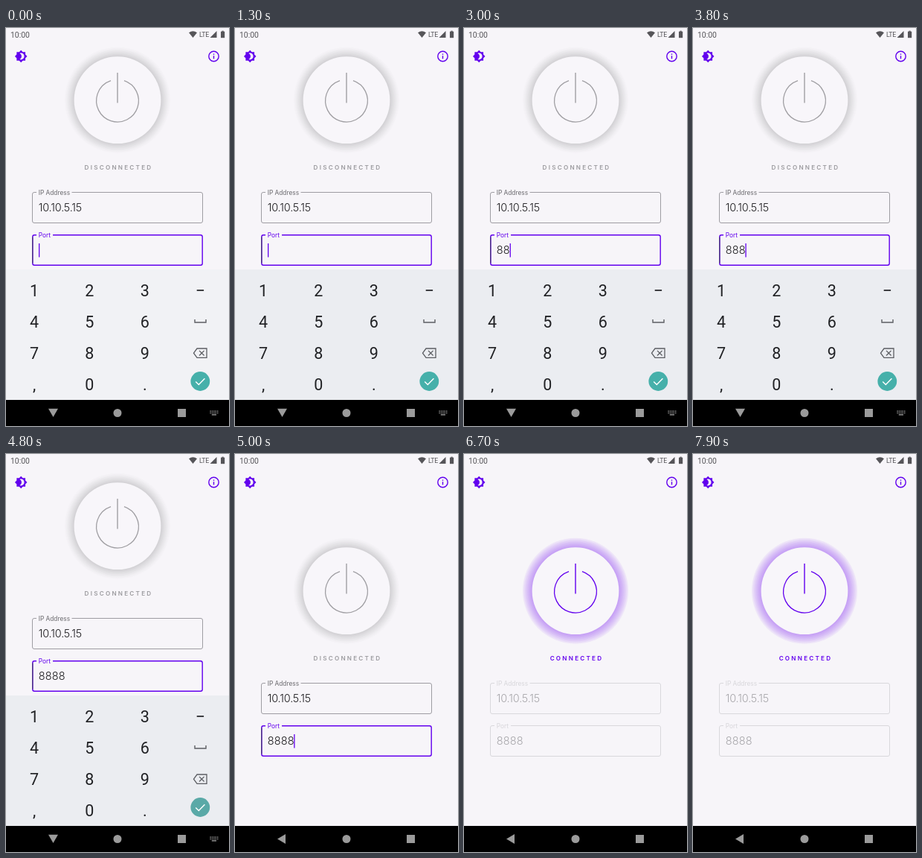
Write an HTML page with a canvas that moves like this. It is 300x534 px and loops after 8 s.

```html
<!DOCTYPE html>
<html lang="en">
<head>
<meta charset="utf-8">
<title>Connection screen</title>
<style>
html, body { margin: 0; width: 100%; height: 100%; overflow: hidden; background: #f7f5f9; }
canvas { display: block; width: 300px; height: 534px; }
</style>
</head>
<body>
<canvas id="stage"></canvas>
<script>
const LOOP = 8000;
const KEYS = [2400, 2900, 3400, 3950];
const SUBMIT = 4700, HIDE = 4900, CONNECT = 6400;
const BG = '#f7f5f9', PURPLE = '#6200ee';
const UI = 'Inter, "Open Sans", sans-serif';
const SYS = 'Roboto, "Noto Sans", sans-serif';

const canvas = document.getElementById('stage');
const ctx = canvas.getContext('2d');
const dpr = window.devicePixelRatio || 1;
canvas.width = 300 * dpr;
canvas.height = 534 * dpr;

const sun = new Path2D('M20 8.69V4h-4.69L12 .69 8.69 4H4v4.69L.69 12 4 15.31V20h4.69L12 23.31 15.31 20H20v-4.69L23.31 12 20 8.69z' +
  'M12 18c-.89 0-1.74-.2-2.5-.55C11.56 16.5 13 14.42 13 12s-1.44-4.5-3.5-5.45C10.26 6.2 11.11 6 12 6c3.31 0 6 2.69 6 6s-2.69 6-6 6z');

function mix(a, b, k) {
  return `rgb(${a.map((v, i) => Math.round(v + (b[i] - v) * k)).join(',')})`;
}

function text(str, x, y, font, color, align = 'left', spacing = 0) {
  ctx.font = font;
  ctx.fillStyle = color;
  ctx.textAlign = align;
  ctx.letterSpacing = spacing + 'px';
  ctx.fillText(str, x, y);
  ctx.letterSpacing = '0px';
}

function rect(x, y, w, h, color) {
  ctx.fillStyle = color;
  ctx.fillRect(x, y, w, h);
}

function disc(x, y, r, color) {
  ctx.fillStyle = color;
  ctx.beginPath();
  ctx.arc(x, y, r, 0, Math.PI * 2);
  ctx.fill();
}

function poly(points, color) {
  ctx.fillStyle = color;
  ctx.beginPath();
  points.forEach(([x, y]) => ctx.lineTo(x, y));
  ctx.fill();
}

function line(points, color, width, close) {
  ctx.strokeStyle = color;
  ctx.lineWidth = width;
  ctx.beginPath();
  points.forEach(([x, y]) => ctx.lineTo(x, y));
  if (close) ctx.closePath();
  ctx.stroke();
}

function statusBar() {
  const grey = '#565559';
  text('10:00', 6, 13, '10.4px ' + SYS, grey);
  text('LTE', 260, 12.2, '8.8px ' + SYS, grey, 'left', -0.3);
  ctx.fillStyle = grey;
  ctx.beginPath();
  ctx.moveTo(251.5, 13);
  ctx.lineTo(246, 6.3);
  ctx.quadraticCurveTo(251.5, 2.3, 257, 6.3);
  ctx.fill();
  poly([[274.5, 13], [283.5, 13], [283.5, 4]], grey);
  rect(289, 4.7, 5.2, 8.5, grey);
  rect(290.5, 3.7, 2.2, 1.2, grey);
}

function topIcons() {
  ctx.save();
  ctx.translate(20.2, 38);
  ctx.scale(0.73, 0.73);
  ctx.translate(-12, -12);
  ctx.fillStyle = PURPLE;
  ctx.fill(sun);
  ctx.restore();
  ctx.strokeStyle = PURPLE;
  ctx.lineWidth = 1.4;
  ctx.beginPath();
  ctx.arc(279.5, 38, 6.7, 0, Math.PI * 2);
  ctx.stroke();
  rect(278.8, 37.2, 1.4, 4.2, PURPLE);
  rect(278.8, 34.5, 1.4, 1.4, PURPLE);
}

function powerButton(cy, on) {
  const base = [247, 245, 249];
  const edge = on ? [198, 160, 245] : [211, 210, 213];
  const steps = 8;
  for (let i = 0; i < steps; i++) {
    const k = (i + 1) / steps;
    disc(150, cy, 71 - i * 1.6, mix(base, edge, Math.pow(k, on ? 0.8 : 1.25)));
  }
  disc(150, cy, 58.4, '#f8f6fa');
  const ink = on ? PURPLE : '#a09fa3';
  const gap = 0.32;
  ctx.strokeStyle = ink;
  ctx.lineWidth = 1.3;
  ctx.beginPath();
  ctx.arc(150, cy + 0.9, 28.4, -Math.PI / 2 + gap, Math.PI * 1.5 - gap);
  ctx.stroke();
  line([[150, cy - 36.7], [150, cy + 3.7]], ink, 1.4);
}

function field(y, label, notchEnd, value, look, spacing) {
  const inset = look.focus ? 0.3 : 0;
  ctx.strokeStyle = look.border;
  ctx.lineWidth = look.width;
  ctx.beginPath();
  ctx.roundRect(35.5 + inset, y + inset, 229 - 2 * inset, 41 - 2 * inset, 2.5);
  ctx.stroke();
  if (look.focus) line([[35.7, y + 3], [35.7, y + 38]], '#45307a', 1.3);
  rect(41, y - 2, notchEnd - 41, 4, BG);
  text(label, 43.7, y + 3.9, '8.3px ' + UI, look.label);
  text(value, 43.7, y + 25.8, '300 14.5px ' + UI, look.value, 'left', spacing);
}

function keyboard(t) {
  const ink = '#202124', soft = '#5c5e63';
  rect(0, 324, 300, 175, mix([241, 242, 245], [235, 237, 241], Math.min(1, t / 700)));
  const rows = ['123', '456', '789', ',0.'];
  rows.forEach((row, r) => [...row].forEach((ch, c) =>
    text(ch, 38 + c * 74.4, 360 + r * 42.1, '21.5px ' + SYS, ink, 'center')));
  rect(256.7, 351.1, 9.4, 1.7, ink);
  line([[254, 391], [254, 395], [269, 395], [269, 391]], soft, 1.4);
  line([[252.5, 436.2], [257, 430], [270, 430], [270, 442.4], [257, 442.4]], soft, 1.3, true);
  line([[260, 432.9], [266.6, 439.5]], soft, 1.3);
  line([[266.6, 432.9], [260, 439.5]], soft, 1.3);
  disc(261.3, 474, 12.9, t >= SUBMIT ? '#5aa9a7' : '#46b0aa');
  line([[255.2, 474.6], [259.3, 478.6], [267.4, 470.2]], '#fff', 1.4);
}

function navBar(open) {
  const grey = '#9b9b9b';
  rect(0, 499, 300, 35, '#000');
  if (open) {
    poly([[57, 510.8], [70, 510.8], [63.5, 522]], grey);
    for (let r = 0; r < 2; r++)
      for (let c = 0; c < 5; c++) rect(274.4 + c * 2.4, 513.4 + r * 2.4, 1.4, 1.4, grey);
    rect(276.8, 518.2, 6.2, 1.4, grey);
  } else {
    poly([[57, 516.5], [68, 510], [68, 523]], grey);
  }
  disc(150, 516.5, 5.5, grey);
  rect(231, 511, 11, 11, grey);
}

function cursorOn(t) {
  const last = KEYS.filter(k => k <= t).pop() || 0;
  return (t - last) % 1000 < 500;
}

function draw(t) {
  const open = t < HIDE, on = t >= CONNECT;
  const dy = open ? 0 : 87;
  const typed = '8'.repeat(KEYS.filter(k => k <= t).length);
  ctx.setTransform(dpr, 0, 0, dpr, 0, 0);
  rect(0, 0, 300, 534, BG);
  statusBar();
  topIcons();
  powerButton(96.7 + dy, on);
  text(on ? 'CONNECTED' : 'DISCONNECTED', 151.5, 190.2 + dy, '600 8.1px ' + UI,
    on ? PURPLE : '#9c9b9f', 'center', 2.25);

  const idle = { border: '#99989d', width: 0.95, label: '#69686c', value: '#1c1b1e' };
  const off = { border: '#d9d8dc', width: 1, label: '#d7d6da', value: '#a8a7ab' };
  const focus = { border: PURPLE, width: 1.4, label: PURPLE, value: '#1c1b1e', focus: true };
  field(220.5 + dy, 'IP Address', 88.5, '10.10.5.15', on ? off : idle, -0.2);
  field(277.5 + dy, 'Port', 63, typed, on ? off : focus, 0.15);
  if (!on && cursorOn(t)) rect(44 + typed.length * 8.8, 289 + dy, 1.3, 18.5, PURPLE);

  if (open) keyboard(t);
  navBar(open);
}

const start = performance.now();
function tick() {
  draw((performance.now() - start) % LOOP);
  requestAnimationFrame(tick);
}
tick();
</script>
</body>
</html>
```
